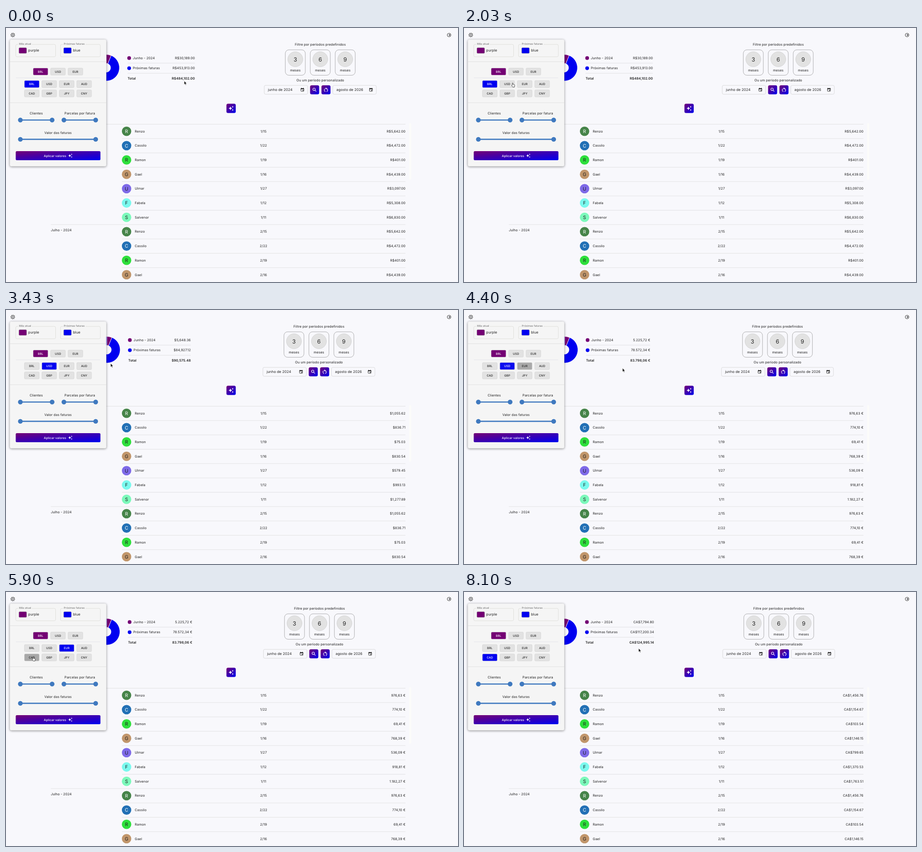
Write an HTML page that moves like this. It is 998x561 px and loops after 9070 ms.

```html
<!DOCTYPE html>
<html lang="pt-BR">
<head>
<meta charset="utf-8">
<title>Faturas</title>
<style>
  html, body { margin: 0; height: 100%; overflow: hidden; background: #f8f8fc; }
  svg { display: block; width: 100vw; height: 100vh; }
  text { font: 7.4px Inter, sans-serif; fill: #222; letter-spacing: .01em; text-rendering: geometricPrecision; }
</style>
</head>
<body>
<svg id="stage" viewBox="0 0 998 561"></svg>
<script>
const LOOP = 9070;
const PURPLE = '#740074', BLUE = '#0000f0', GREY = '#e2e2e2', DARK = '#a8a8a8', RULE = '#d2d2d2';
const SPARKLES = 'M19 9l1.25-2.75L23 5l-2.75-1.25L19 1l-1.25 2.75L15 5l2.75 1.25zM11.5 9.5L9 4 6.5 9.5 1 12l5.5 2.5L9 20l2.5-5.5L17 12zM19 15l-1.25 2.75L15 19l2.75 1.25L19 23l1.25-2.75L23 19l-2.75-1.25z';
const SUN = 'M20 8.7V4h-4.7L12 .7 8.7 4H4v4.7L.7 12 4 15.3V20h4.7l3.3 3.3 3.3-3.3H20v-4.7l3.3-3.3zM18 14.5V18h-3.5L12 20.5 9.5 18H6v-3.5L3.5 12 6 9.5V6h3.5L12 3.5 14.5 6H18v3.5l2.5 2.5zM12 7v10a5 5 0 0 0 0-10z';

// Currency layouts: legend edges and the shift of the filter block
const currencies = {
  BRL: { rate: 1, locale: 'en-US', left: 268.3, right: 417, shift: 0 },
  USD: { rate: .1871, locale: 'en-US', left: 269.9, right: 408, shift: -3 },
  EUR: { rate: .1731, locale: 'de-DE', left: 269.3, right: 411.3, shift: -1.8 },
  CAD: { rate: .2582, locale: 'en-US', left: 267.8, right: 419.6, shift: 1.1 }
};
// Each choice: when the pointer reaches the button and when the amounts change
const picks = [
  { code: 'BRL', hover: -2000, apply: -1000 },
  { code: 'USD', hover: 2040, apply: 2620 },
  { code: 'EUR', hover: 3700, apply: 4390 },
  { code: 'CAD', hover: 5380, apply: 6230 }
];
const pointerPath = [
  [0, 393.5, 117], [1700, 393.5, 117], [2030, 107.5, 121], [2150, 97, 123], [2400, 97, 123],
  [2900, 385, 125], [3230, 385, 125], [3430, 231, 118], [3530, 231, 118], [3750, 136, 122],
  [4150, 136, 122], [4400, 350, 128.5], [4600, 390, 124], [4900, 390, 124], [5200, 112.5, 141],
  [5450, 60, 143], [6150, 60, 143], [6400, 95, 145], [6800, 380, 126], [7130, 385.5, 124.5], [LOOP, 385.5, 124.5]
];
const clients = [
  ['Renzo', 15, 5642, '#468449', '#fff'], ['Cassilo', 22, 4472, '#2270b5', '#fff'],
  ['Ramon', 19, 401, '#2ee03c', '#222'], ['Gael', 16, 4439, '#c1966b', '#222'],
  ['Ulmar', 27, 3097, '#7e6ae8', '#222'], ['Fabela', 12, 5308, '#7af9ee', '#222'],
  ['Salvenor', 11, 6830, '#7cf9bb', '#222']
];
const rows = Array.from({ length: 11 }, (_, i) => ({ y: 228.1 + i * 31.68, part: i < 7 ? 1 : 2, client: clients[i % 7] }));
const toggles = ['BRL', 'USD', 'EUR', 'AUD', 'CAD', 'GBP', 'JPY', 'CNY']
  .map((code, i) => ({ code, x: 57 + i % 4 * 38.5, y: i < 4 ? 123.9 : 144.5 }));

const clamp = v => Math.max(0, Math.min(1, v));
const text = (x, y, s, anchor = 'start', style = '') =>
  `<text x="${x}" y="${y + 2.6}" text-anchor="${anchor}" style="${style}">${s}</text>`;
const rect = (x, y, w, h, r, fill, extra = '') =>
  `<rect x="${x}" y="${y}" width="${w}" height="${h}" rx="${r}" fill="${fill}" ${extra}/>`;
const circle = (x, y, r, fill, extra = '') => `<circle cx="${x}" cy="${y}" r="${r}" fill="${fill}" ${extra}/>`;
const line = (x1, x2, y, color = RULE, width = .6) =>
  `<path d="M${x1} ${y}H${x2}" stroke="${color}" stroke-width="${width}"/>`;
const icon = (x, y, scale, d, fill = '#fff') =>
  `<path transform="translate(${x} ${y}) scale(${scale}) translate(-12 -12)" d="${d}" fill="${fill}" fill-rule="evenodd"/>`;
const outline = color => `stroke="${color}" stroke-width=".6"`;

const toggle = (x, y, code, fill, id = '', color = '#222') =>
  rect(x - 16.3, y - 7.8, 32.6, 15.6, 2, fill, outline('#cfcfcf') + id) +
  text(x, y - .3, code, 'middle', `font-size:6.3px;font-weight:500;fill:${color}`);

function colorField(x, label, labelWidth, color, name) {
  return rect(x, 36.2, 88, 27.4, 3, 'none', outline('#d0d0ca')) +
    rect(x + 6, 35, labelWidth + 3, 3, 0, '#f5f5f5') +
    text(x + 7.3, 34.8, label, 'start', 'font-size:5.7px;fill:#666') +
    rect(x + 7, 43.6, 17, 12.4, 1.8, color, outline('#999')) +
    text(x + 27.6, 49.8, name, 'start', 'font-size:7.8px');
}

function slider(x1, x2, y, label) {
  return text((x1 + x2) / 2, y - 14.4, label, 'middle') + line(x1, x2, y, '#3f79bf', 2.6) +
    circle(x1, y, 5.2, '#3f79bf') + circle(x2, y, 5.2, '#3f79bf');
}

function panel() {
  return rect(8.5, 25.5, 213, 280, 4, '#f5f5f5', 'style="filter:drop-shadow(0 1.5px 2.5px #0007)"') +
    colorField(21.5, 'Mês atual', 26, PURPLE, 'purple') +
    colorField(120.3, 'Próximas faturas', 46, BLUE, 'blue') +
    line(8.5, 221.5, 74.5) + line(22, 208, 110, '#d8d8e4') + line(8.5, 221.5, 165) +
    ['BRL', 'USD', 'EUR'].map((c, i) => toggle(76.3 + i * 38.5, 96.3, c, i ? GREY : PURPLE, '', i ? '#222' : '#fff')).join('') +
    toggles.map(b => toggle(b.x, b.y, b.code, GREY, ` id="toggle${b.code}"`)).join('') +
    slider(31.7, 101.8, 203.2, 'Clientes') + slider(127.9, 198, 203.2, 'Parcelas por fatura') +
    slider(31.7, 198, 245.9, 'Valor das faturas') +
    rect(21.5, 272, 187, 20, 2.5, 'url(#blend)') +
    text(108.3, 282, 'Aplicar valores', 'middle', 'font-size:6.8px;font-weight:500;fill:#fff') +
    icon(142, 282, .42, SPARKLES);
}

function dateField(x, label) {
  const c = x + 84.2;
  return rect(x, 126.7, 96, 19.6, 3, 'none', outline('#c4c4c4')) +
    text(x + 8, 136.1, label, 'start', 'font-size:7.8px') +
    rect(c - 3.3, 133.6, 6.6, 6, .6, 'none', 'stroke="#222" stroke-width=".9"') +
    line(c - 3.6, c + 3.6, 134.4, '#222', 1.7) +
    `<path d="M${c - 2} 132v2M${c + 2} 132v2" stroke="#222"/>` + rect(c + .4, 136.8, 1.9, 1.8, 0, '#222');
}

function filters() {
  const presets = [3, 6, 9].map((n, i) => {
    const x = 638.8 + i * 55.1;
    return rect(x - 22.1, 48.2, 44.2, 56.2, 8, 'none', 'stroke="#777" stroke-width=".6"') +
      circle(x, 69, 16.6, '#e2e2e2', outline('#c4c4c4')) +
      text(x, 70.9, n, 'middle', 'font-size:12.4px') + text(x, 93, 'meses', 'middle');
  }).join('');
  return text(693.9, 36.6, 'Filtre por períodos predefinidos', 'middle') + presets +
    text(693.9, 115.8, 'Ou um período personalizado', 'middle') +
    dateField(570.2, 'junho de 2024') + dateField(721.6, 'agosto de 2026') +
    rect(671.4, 126.5, 20, 20, 3.5, 'url(#blend)') + rect(696.5, 126.5, 20, 20, 3.5, 'url(#blend)') +
    `<g fill="none" stroke="#fff" stroke-width="1.1"><circle cx="680.2" cy="135.4" r="2.6"/><path d="M682 137.2l3.2 3.2"/>
     <path d="M705.2 140.4a3.5 3.5 0 0 1-1.2-6.1M707.8 140.4a3.5 3.5 0 0 0-1.2-6.8"/></g>
     <path d="M707.2 131.2v4.6l-2.4-2.3z" fill="#fff"/>`;
}

function donut(x, y) {
  const angle = 30189 / 484102 * 2 * Math.PI;
  const at = (r, a) => `${x + r * Math.sin(a)} ${y - r * Math.cos(a)}`;
  const slice = (a, b, big, color) =>
    `<path d="M${at(29.3, a)}A29.3 29.3 0 ${big} 1 ${at(29.3, b)}L${at(9.8, b)}A9.8 9.8 0 ${big} 0 ${at(9.8, a)}z" fill="${color}" stroke="#fff" stroke-width=".8"/>`;
  return slice(0, angle, 0, PURPLE) + slice(angle, 2 * Math.PI, 1, BLUE);
}

function amounts(code) {
  const { rate, locale, left, right } = currencies[code];
  const money = v => (v * rate).toLocaleString(locale, { style: 'currency', currency: code });
  const bold = 'font-weight:600';
  const entry = (y, color, label, value) => circle(left + 3.6, y, 4.1, color) +
    text(left + 11.7, y, label) + text(right, y, money(value), 'end') + line(left, right, y + 11.2);
  return donut(left - 47.2, 87.8) +
    entry(66.4, PURPLE, 'Junho - 2024', 30189) + entry(88.8, BLUE, 'Próximas faturas', 453913) +
    text(left + .2, 111, 'Total', 'start', bold) + text(right, 111, money(484102), 'end', bold) +
    rows.map(r => text(882, r.y, money(r.client[2]), 'end')).join('');
}

function table() {
  return rows.map((r, i) => {
    const [name, total, , color, ink] = r.client;
    return line(i % 7 ? 256 : 99, 882, r.y - 15.6) + circle(266.2, r.y, 10.4, color) +
      text(266.2, r.y + 1.2, name[0], 'middle', `font-size:10.4px;fill:${ink}`) +
      text(284.3, r.y, name) + text(568.6, r.y, `${r.part}/${total}`, 'middle');
  }).join('') + text(99, 446.2, 'Julho - 2024') + rect(890, 210, 5, 125, 2, '#fcfcfa');
}

const $ = id => document.getElementById(id);
$('stage').innerHTML = `
  <defs><linearGradient id="blend" x2="1" y2="1"><stop stop-color="${PURPLE}"/><stop offset="1" stop-color="${BLUE}"/></linearGradient></defs>
  <g fill="none" stroke="#555"><circle cx="15" cy="15.4" r="3.5"/><circle cx="15" cy="15.4" r="1.5"/>
  <circle cx="15" cy="15.4" r="4.4" pathLength="16" stroke-dasharray="1" stroke-width="1.2"/></g>
  ${icon(978.3, 15.5, .45, SUN, '#444')}
  ${table()}<g id="amounts"></g><g id="filters">${filters()}</g>
  ${rect(486.7, 167.2, 20.6, 20.6, 3.5, 'url(#blend)')}${icon(497, 177.5, .5, SPARKLES)}
  ${panel()}
  <g id="pointer" stroke-linejoin="round">
    <path id="arrow" d="M0 0v8l1.9-1.7 1.3 2.9 1.3-.6-1.3-2.8h2.5z" fill="#111" stroke="#fff" stroke-width=".6"/>
    <path id="hand" d="M-.9 5.2V.8q.9-1.3 1.7 0v2.7l2.9.7q.9.3.8 1.3L4 9.4H.2L-2.3 6.2q.1-1.2 1.4-1z" fill="#fff" stroke="#222" stroke-width=".8"/>
  </g>`;

const mix = (from, to, k) => {
  const rgb = c => c.match(/\w\w/g).map(h => parseInt(h, 16));
  const a = rgb(from), b = rgb(to);
  return `#${a.map((v, i) => Math.round(v + (b[i] - v) * k).toString(16).padStart(2, '0')).join('')}`;
};

function paintToggles(t) {
  for (const { code } of toggles) {
    const i = picks.findIndex(p => p.code === code);
    if (i < 0) continue;
    const pick = picks[i], next = picks[i + 1];
    const hover = clamp((t - pick.hover) / 150) * (1 - clamp((t - pick.apply) / 300));
    const on = clamp((t - pick.apply - 180) / 150);
    const off = next ? clamp((t - next.apply) / 200) : 0;
    const selected = on * (1 - off), box = $('toggle' + code);
    box.setAttribute('fill', mix(mix(GREY, DARK, hover), BLUE, selected));
    box.nextElementSibling.style.fill = selected > .4 ? '#fff' : '#222';
  }
}

function movePointer(t) {
  const i = pointerPath.findIndex(k => k[0] > t);
  const [t0, x0, y0] = pointerPath[i - 1], [t1, x1, y1] = pointerPath[i];
  const k = (t - t0) / (t1 - t0), e = k * k * (3 - 2 * k);
  const x = x0 + (x1 - x0) * e, y = y0 + (y1 - y0) * e;
  const over = toggles.some(b => Math.abs(x - b.x) < 17.5 && Math.abs(y - b.y) < 9);
  $('pointer').setAttribute('transform', `translate(${x} ${y})`);
  $('arrow').style.display = over ? 'none' : '';
  $('hand').style.display = over ? '' : 'none';
}

let shown;
function frame(now) {
  const t = now % LOOP;
  const { code } = picks.filter(p => p.apply <= t).pop();
  if (code !== shown) {
    shown = code;
    $('amounts').innerHTML = amounts(code);
    $('filters').setAttribute('transform', `translate(${currencies[code].shift} 0)`);
  }
  paintToggles(t);
  movePointer(t);
  requestAnimationFrame(frame);
}
const start = performance.now();
requestAnimationFrame(function first(now) { frame(Math.max(0, now - start)); });
</script>
</body>
</html>
```
